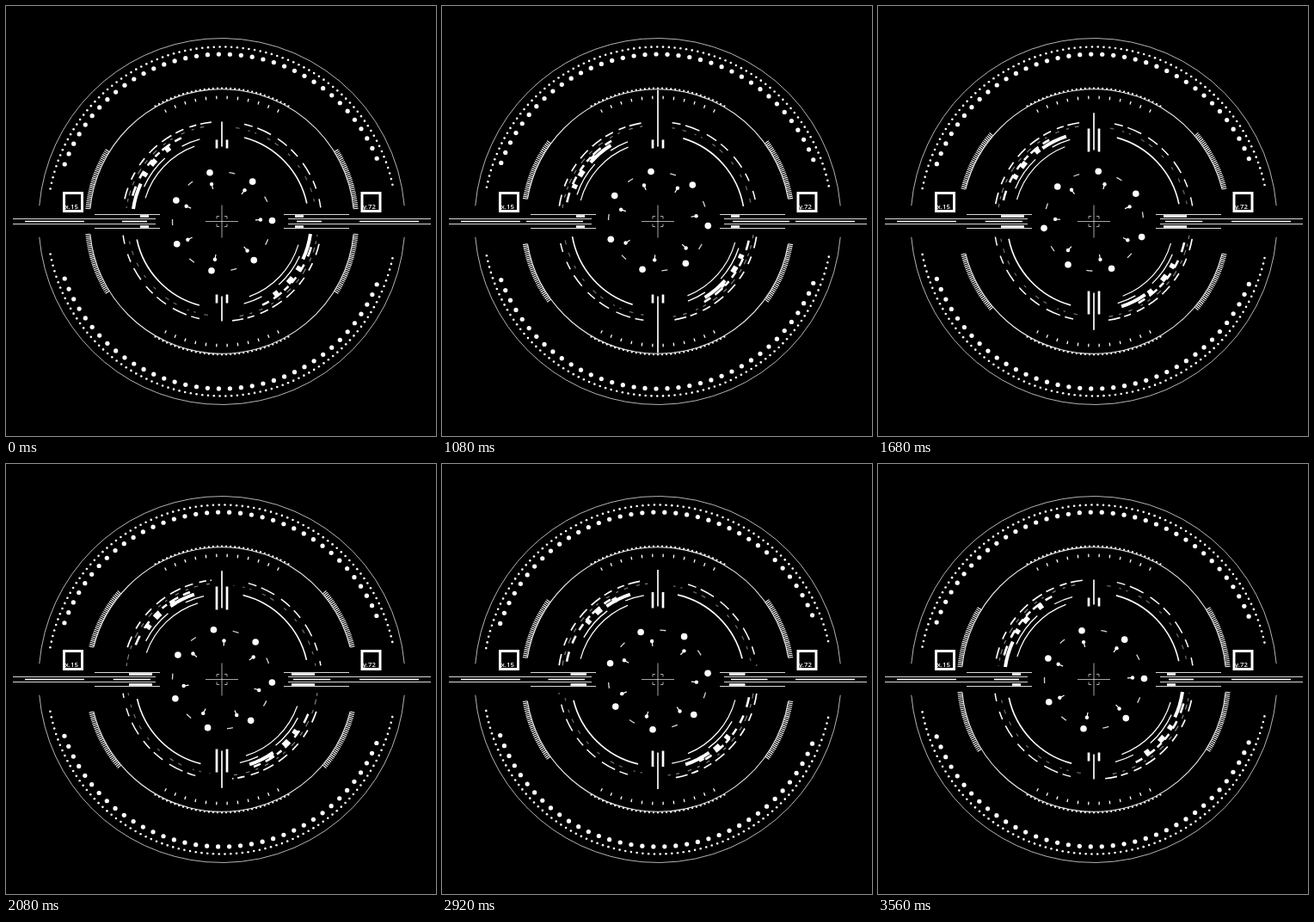
These frames come from a looping animation (500 px wide and 500 px high, 3600 ms). An HTML page with a canvas:

```html
<!DOCTYPE html>
<html lang="en">
<head>
<meta charset="utf-8">
<title>Targeting HUD</title>
<style>
html, body { margin: 0; height: 100%; overflow: hidden; background: #000; }
canvas { display: block; }
</style>
</head>
<body>
<canvas id="hud" width="500" height="500"></canvas>
<script>
const ctx = document.getElementById('hud').getContext('2d');
const LOOP = 3600, STEP = 40, TAU = Math.PI * 2;
const KEY_TIMES = [0, 480, 1080, 1680, 2440, 2920, 3560];
const rad = deg => deg * Math.PI / 180;
const noise = n => { const v = Math.sin(n * 127.1) * 43758.5453; return v - Math.floor(v); };
const wave = (t, turns = 1) => Math.sin(TAU * turns * t / LOOP);

function ease(t, from, to) {
  const u = Math.min(1, Math.max(0, (t - from) / (to - from)));
  return u * u * (3 - 2 * u);
}

// Rises from 0 to 1 between a and b, falls back between c and d.
const pulse = (t, a, b, c, d) => ease(t, a, b) - ease(t, c, d);

// Eased value through one key per entry of KEY_TIMES, wrapping at the end.
function swing(t, keys) {
  const i = KEY_TIMES.findLastIndex(k => k <= t);
  const next = KEY_TIMES[i + 1] ?? LOOP;
  return keys[i] + (keys[(i + 1) % keys.length] - keys[i]) * ease(t, KEY_TIMES[i], next);
}

function dashes(seed, from, to, length, gap) {
  const list = [];
  for (let a = from, n = seed; a < to; n += 2) {
    const end = a + length * (0.5 + noise(n));
    list.push([a, end]);
    a = end + gap * (0.5 + noise(n + 1));
  }
  return list;
}

const LEFT = [8, 84], RIGHT = [97, 172];
const sway = (amount, turns) => t => amount * wave(t, turns);
const RINGS = [
  { r: 104, w: 4, span: LEFT, arcs: [[8, 25]], turn: t => 47 * pulse(t, 0, 1680, 2920, 3560) },
  { r: 105, w: 6, span: LEFT, arcs: dashes(12, 30, 58, 3.5, 6), turn: sway(-9, 1) },
  { r: 108, w: 2.6, span: LEFT, arcs: dashes(3, 16, 66, 5, 4), turn: sway(7, 2) },
  { r: 93, w: 1.2, span: LEFT, arcs: [[17, 70]], turn: sway(3, 2) },
  { r: 99, w: 1.3, span: LEFT, arcs: [[24, 48], [62, 75]], turn: sway(-6, 1) },
  { r: 116, w: 1.7, span: LEFT, arcs: dashes(41, 13, 80, 5, 4), turn: sway(7, 2) },
  { r: 112, w: 1.2, alpha: 0.5, span: LEFT, arcs: dashes(5, 0, 90, 2.5, 4), turn: sway(8, 1) },
  { r: 101, w: 1.6, span: RIGHT, arcs: [[105, 168]], turn: sway(2, 1) },
  { r: 116, w: 1.5, span: RIGHT, arcs: dashes(22, 103, 168, 6, 5), turn: sway(-5, 1) },
  { r: 110, w: 1.3, alpha: 0.4, span: RIGHT, arcs: dashes(31, 92, 178, 2, 6), turn: sway(7, 1) }
];

function line(x1, y1, x2, y2, w = 1) {
  ctx.lineWidth = w;
  ctx.beginPath();
  ctx.moveTo(x1, y1);
  ctx.lineTo(x2, y2);
  ctx.stroke();
}

function arc(r, from, to, w = 1) {
  ctx.lineWidth = w;
  ctx.beginPath();
  ctx.arc(0, 0, r, rad(from), rad(to));
  ctx.stroke();
}

function dot(r, deg, size) {
  ctx.beginPath();
  ctx.arc(r * Math.cos(rad(deg)), r * Math.sin(rad(deg)), size, 0, TAU);
  ctx.fill();
}

function spoke(r1, r2, deg, w) {
  const c = Math.cos(rad(deg)), s = Math.sin(rad(deg));
  line(r1 * c, r1 * s, r2 * c, r2 * s, w);
}

function withAlpha(alpha, draw) {
  ctx.globalAlpha = alpha;
  draw();
  ctx.globalAlpha = 1;
}

// Lower half of the frame; the upper half is its mirror image.
function drawFrame(t) {
  withAlpha(0.7, () => arc(213, 4.9, 175.1));
  const drift = 0.5 * wave(t), gap = 3.83;
  for (let i = 0; i <= 82; i++) dot(203, 169.2 - i * gap / 2 - drift, 1.3);
  for (let i = 0; i <= 36; i++) dot(194.5, 160 - i * gap - drift, 2.6);

  const low = 5.5 + 8.6 * pulse(t, 480, 1680, 2200, 3560);
  withAlpha(0.9, () => arc(153.8, low, 180 - low, 1.1));
  for (let i = 0; i <= 32; i++) {
    const a = low + i * 0.82;
    spoke(154, 159.3, a, 1.1);
    spoke(154, 159.3, 180 - a, 1.1);
    dot(154.9, 60 + i * 1.875, 1.15);
  }
  for (let i = 0; i < 12; i++) spoke(142.3, 146, 63 + i * 4.91, 1.3);

  withAlpha(0.85, () => {
    for (const x of [-1, 1]) {
      line(x * 77, 3, x * 243, 3);
      line(x * 72, 8, x * 148, 8);
    }
  });
}

// Half of the dashed rings; the other half is turned by 180 degrees.
function drawRings(t) {
  for (const { r, w, alpha = 1, span, arcs, turn } of RINGS) {
    const shift = turn(t);
    withAlpha(alpha, () => {
      for (const [a, b] of arcs) {
        const from = Math.max(span[0], a + shift), to = Math.min(span[1], b + shift);
        if (to > from) arc(r, from, to, w);
      }
    });
  }
}

// Sliding pointer, one for each of the four directions.
function drawPointer(t) {
  const reach = 37 * pulse(t, 0, 1080, 1080, 2000) + 19 * pulse(t, 1680, 2440, 2440, 3560);
  const grow = pulse(t, 1080, 1680, 2440, 3400);
  line(87 - 4 * grow, 0, 116 + reach, 0, 1.7);
  for (const y of [-6, 6]) line(85 - 4 * grow, y, 95 + 13 * grow, y, 2.7);
}

function drawCore(t) {
  const outer = swing(t, [-1, 22, 5, 18, -9, -7, -1]);
  const inner = swing(t, [-2.5, 23, -8, 29, 5, 4, -2.5]);
  for (let i = 0; i < 7; i++) {
    const a = i * 360 / 7;
    dot(58.5, outer + a, 3.8);
    withAlpha(0.85, () => arc(57.5, outer + a + 22.2, outer + a + 29.2, 1.3));
    dot(45, inner + a, 2.2);
    spoke(39, 45, inner + a, 1.2);
  }
  withAlpha(0.65, () => {
    for (let i = 0; i < 4; i++) {
      line(0, 0, 19, 0);
      line(3, 6, 6, 6);
      line(6, 3, 6, 6);
      ctx.rotate(Math.PI / 2);
    }
  });
}

function label(x, text) {
  ctx.lineWidth = 3;
  ctx.strokeRect(x + 1.5, 217.5, 21, 21);
  ctx.fillText(text, x + 2.5, 235.5);
}

function draw(now) {
  const t = Math.floor(now % LOOP / STEP) * STEP;
  ctx.setTransform(1, 0, 0, 1, 0, 0);
  ctx.fillStyle = '#000';
  ctx.fillRect(0, 0, 500, 500);
  ctx.fillStyle = ctx.strokeStyle = '#fff';
  ctx.font = '600 7.8px "Open Sans", sans-serif';
  label(66, 'x.15');
  label(412.5, 'y.72');

  ctx.translate(251, 250.5);
  drawCore(t);
  for (let i = 0; i < 2; i++) {
    drawFrame(t);
    ctx.scale(1, -1);
  }
  line(-229, 0, -160, 0, 1.5);
  line(160, 0, 229, 0, 1.5);
  for (let i = 0; i < 4; i++) {
    if (i % 2 === 0) drawRings(t);
    drawPointer(t);
    ctx.rotate(Math.PI / 2);
  }
}

const start = performance.now();
function tick() {
  draw(performance.now() - start);
  requestAnimationFrame(tick);
}
tick();
</script>
</body>
</html>
```
